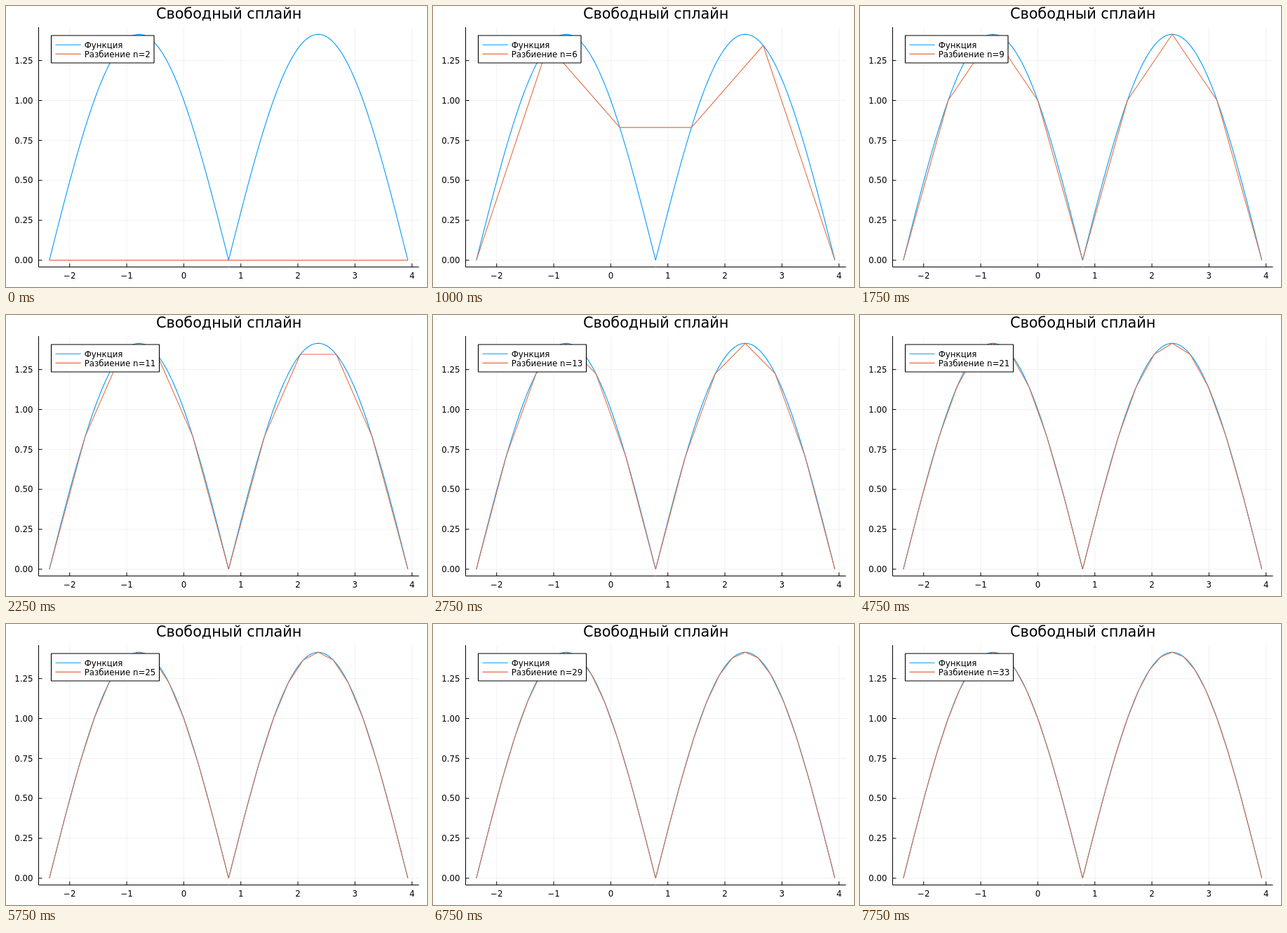
An HTML page with a canvas that plays this animation: 600x400 px, repeating every 8 s.

```html
<!DOCTYPE html>
<html lang="ru">
<head>
<meta charset="utf-8">
<style>
  html, body { margin: 0; width: 100%; height: 100%; overflow: hidden; background: #fff; }
  canvas { display: block; }
</style>
</head>
<body>
<canvas id="stage" width="600" height="400"></canvas>
<script>
const ctx = document.getElementById('stage').getContext('2d');
const STEP = 250, LOOP = 8000;
const BLUE = '#009afa', ORANGE = '#e26f46';
const FONT = '"DejaVu Sans", sans-serif';
const START = -3 * Math.PI / 4, SPAN = 2 * Math.PI;
const LEFT = 46.5, RIGHT = 588.5, TOP = 30.5, BOTTOM = 371.5;
const X_TICKS = [-2, -1, 0, 1, 2, 3, 4];
const Y_TICKS = [0, 0.25, 0.5, 0.75, 1, 1.25];

const f = x => Math.abs(Math.sin(x) - Math.cos(x));
const px = x => 253.4 + 81.32 * x;
const py = y => 361.9 - 227.4 * y;

function line(points, color, width = 1) {
  ctx.beginPath();
  points.forEach(([x, y]) => ctx.lineTo(x, y));
  ctx.strokeStyle = color;
  ctx.lineWidth = width;
  ctx.stroke();
}

function text(str, x, y, align = 'left', size = 11.8) {
  ctx.font = `${size}px ${FONT}`;
  ctx.textAlign = align;
  ctx.fillStyle = '#000';
  ctx.fillText(str, x, y);
}

// Joins n evenly spaced samples of the function.
function plot(n, color) {
  const points = Array.from({ length: n }, (_, i) => {
    const x = START + SPAN * i / (n - 1);
    return [px(x), py(f(x))];
  });
  line(points, color, 1.1);
}

function drawAxes() {
  const grid = 'rgba(0,0,0,0.1)';
  X_TICKS.forEach(v => line([[px(v), TOP], [px(v), BOTTOM]], grid, 0.6));
  Y_TICKS.forEach(v => line([[LEFT, py(v)], [RIGHT, py(v)]], grid, 0.6));
  line([[LEFT, TOP - 0.5], [LEFT, BOTTOM], [RIGHT, BOTTOM]], '#000');
  X_TICKS.forEach(v => {
    line([[px(v), BOTTOM], [px(v), BOTTOM - 5]], '#000');
    text(String(v).replace('-', '\u2212'), px(v), 387.6, 'center');
  });
  Y_TICKS.forEach(v => {
    line([[LEFT, py(v)], [LEFT + 5, py(v)]], '#000');
    text(v.toFixed(2), 38.6, py(v) + 4.2, 'right');
  });
  text('Свободный сплайн', 317.6, 18.4, 'center', 20.75);
}

function drawLegend(n) {
  const width = n < 10 ? 146.5 : 154;
  ctx.fillStyle = '#fff';
  ctx.fillRect(64.5, 42, width, 39);
  ctx.strokeStyle = '#000';
  ctx.lineWidth = 1.1;
  ctx.strokeRect(64.5, 42, width, 39);
  line([[70.5, 55.3], [106.8, 55.3]], BLUE, 1.1);
  line([[70.5, 68.4], [106.8, 68.4]], ORANGE, 1.1);
  text('Функция', 111.7, 59.6);
  text('Разбиение n=' + n, 111.7, 72.7);
}

function frame(time) {
  const n = 2 + Math.floor((time % LOOP) / STEP);
  ctx.fillStyle = '#fff';
  ctx.fillRect(0, 0, 600, 400);
  drawAxes();
  plot(401, BLUE);
  plot(n, ORANGE);
  drawLegend(n);
  requestAnimationFrame(tick);
}

const origin = performance.now();
const tick = () => frame(performance.now() - origin);
ctx.lineJoin = 'bevel';
ctx.fontKerning = 'none';
tick();
</script>
</body>
</html>
```
